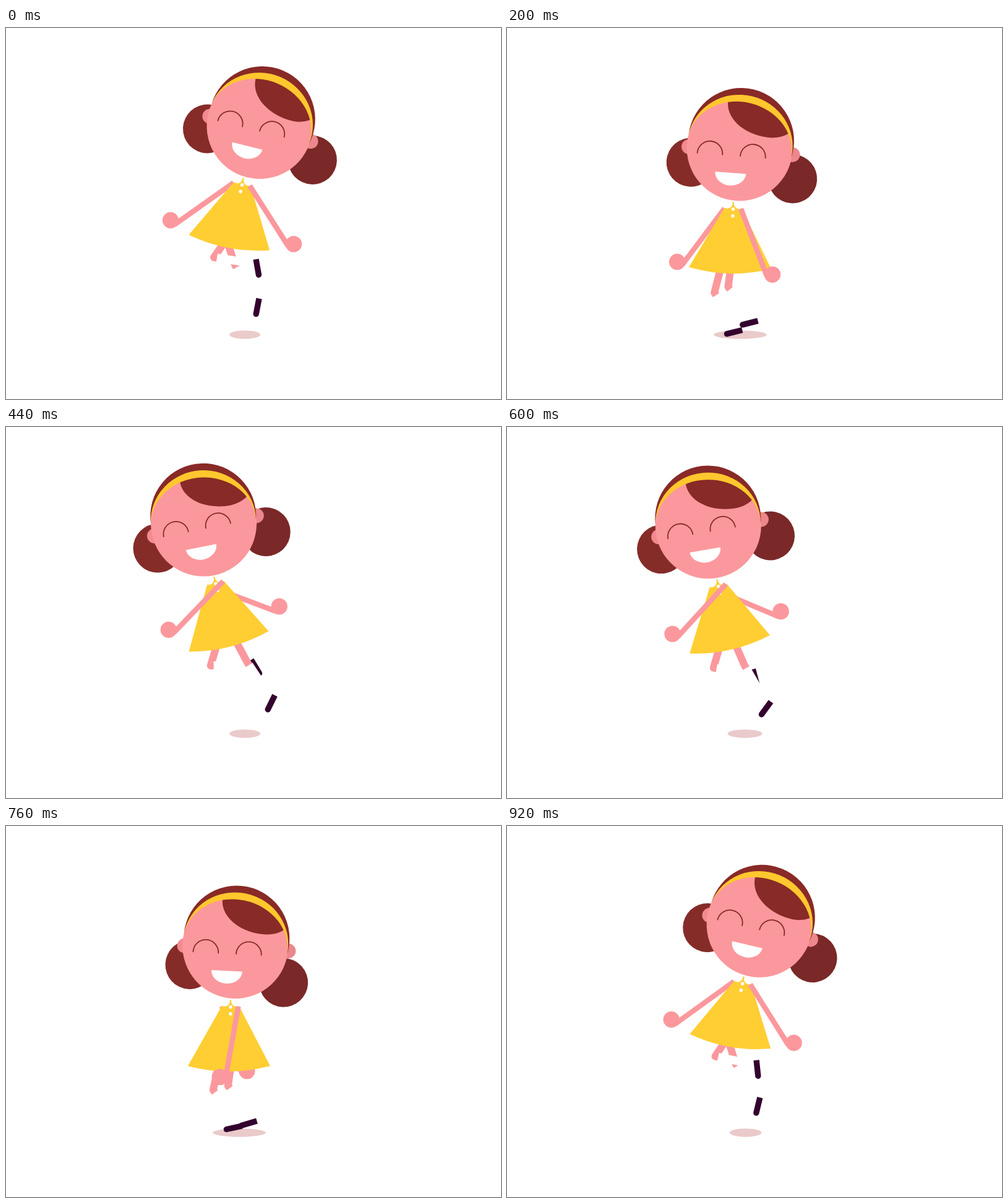
An HTML page with a canvas that plays this animation: 800 by 600 pixels, repeating every 960 ms.

```html
<!DOCTYPE html>
<html lang="en">
<head>
<meta charset="utf-8">
<title>Skipping girl</title>
<style>
  html, body { margin: 0; width: 100%; height: 100%; overflow: hidden; background: #fff; }
  canvas { display: block; width: 800px; height: 600px; }
</style>
</head>
<body>
<canvas id="stage" width="800" height="600"></canvas>
<script>
const ctx = document.getElementById('stage').getContext('2d');
const LOOP = 960, STEP = 40, RAD = Math.PI / 180, TAU = Math.PI * 2;
const SKIN = '#fb989d', HAIR = '#882a27', YELLOW = '#ffce33', SHOE = '#33032e';

// Swings from 1 to -1, holds, and returns; a higher power starts later.
function swing(t, arrive, leave, back, power = 1) {
  const ease = u => Math.cos(Math.PI * Math.min(1, u) ** power);
  return t < leave ? ease(t / arrive) : -ease((t - leave) / (back - leave));
}

// Smooth rise to 1 at the middle, 0 beyond the given width.
function bump(t, middle, width) {
  return Math.cos(Math.min(1, Math.abs(t - middle) / width) * Math.PI / 2) ** 2;
}

function oval(x, y, rx, color, ry = rx) {
  ctx.fillStyle = color;
  ctx.beginPath();
  ctx.ellipse(x, y, rx, ry, 0, 0, TAU);
  ctx.fill();
}

function line(points, width, color) {
  ctx.strokeStyle = color;
  ctx.lineWidth = width;
  ctx.lineCap = 'butt';
  ctx.lineJoin = 'round';
  ctx.beginPath();
  points.forEach(p => ctx.lineTo(...p));
  ctx.stroke();
}

function shape(d, color) {
  ctx.fillStyle = color;
  ctx.fill(new Path2D(d));
}

function local(x, y, deg, draw) {
  ctx.save();
  ctx.translate(x, y);
  ctx.rotate(deg * RAD);
  draw();
  ctx.restore();
}

function drawLeg(hip, knee, heel, foot) {
  const a = foot * RAD, dx = Math.cos(a), dy = Math.sin(a);
  const ankle = [heel[0] + 6 * dx - 5 * dy, heel[1] + 6 * dy + 5 * dx];
  const ux = ankle[0] - knee[0], uy = ankle[1] - knee[1], k = 5 / Math.hypot(ux, uy);
  const cuff = [knee[0] + ux * k, knee[1] + uy * k];
  line([hip, knee, cuff], 12, SKIN);
  line([cuff, ankle], 13.5, '#fff');
  local(...heel, foot, () =>
    shape('M0-4.7H25.5A4.7 4.7 0 0 1 25.5 4.7H0Z', SHOE));
}

// The legs trade roles with the sway; the planted foot is set apart by the stride.
function drawLegs(sway, low, touch, stride, hipY) {
  const between = (a, b) => (a + b + (a - b) * sway) / 2;
  const side = stride * low, apart = 13 * side, lift = 4 * side;
  drawLeg(
    [between(356, 344) + 5 * low - 9 * side, hipY],
    [between(370, 330) - 7 * low - apart, between(383, 386) + 40 * low + lift],
    [between(409, 396) - 11 * touch - 13 * stride * touch,
      between(437.5, 375.5) + 70 * touch + lift],
    between(101, 58) + 81 * touch);
  drawLeg(
    [between(357, 369) - 8 * low + 9 * side, hipY],
    [between(336, 391) - 12 * low + apart, between(371, 381) + 48 * low - lift],
    [between(404, 435) - 23 * touch + 13 * stride * touch,
      between(374, 435) + 81 * touch - lift],
    between(80, 117) + 72 * touch);
}

function drawArm(neck, turn, side, deg, length) {
  const r = turn * RAD, c = Math.cos(r), s = Math.sin(r);
  const x = neck[0] + side * c - 10 * s, y = neck[1] + side * s + 10 * c;
  const a = deg * RAD, dx = -Math.sin(a), dy = Math.cos(a);
  const hx = x + dx * length, hy = y + dy * length;
  // The wrist sits on the inner side of the hand and swaps as the arm passes vertical.
  const flip = Math.max(-1, Math.min(1, deg / 8)) * 9;
  const wrist = [hx - 4 * dx + flip * dy, hy - 4 * dy - flip * dx];
  line([[x, y], wrist], 8.5, SKIN);
  oval(...wrist, 4.25, SKIN);
  oval(hx, hy, 13.2, SKIN);
}

function drawDress(neck, turn) {
  local(...neck, turn, () => {
    shape('M-14 9L0-1L14 10L63.5 106.5Q-4 124-69.5 106.3Z', YELLOW);
    oval(-9.5, 1.5, 8.5, '#fff');
    oval(9.5, 2, 8.5, '#fff');
    oval(0, 11, 2.8, '#fff');
    oval(-0.3, 22, 2.8, '#fff');
  });
}

function drawHead(x, y, turn, nod, droop) {
  local(x, y, turn, () => {
    oval(-81 + 9 * droop, 24.5 + 10 * droop, 39.5, '#852c29');
    oval(96 - 15.5 * droop, 33 + 23 * droop, 39.5, '#7a2828');
    oval(-82, 4, 12, '#f38a90');
    oval(86, 4.4, 12, '#ec878d');
    oval(0, 0, 85.5, SKIN);
    shape('M-24.5-72C-24-43 10-20 50-20.5Q64-21 75.5-28L79-35L50-66L10-82L-25-76Z', HAIR);
    local(1.3, -10.5, 9, () => {
      shape('M-85 8A85.5 85.5 0 1 1 85 8A85 80 0 0 0-85 8Z', HAIR);
      shape('M-85 10V6A85 81.5 0 0 1 85 6V10A85 74 0 0 0-85 10Z', '#ffc72e');
    });
    ctx.translate(0, nod);
    ctx.strokeStyle = HAIR;
    ctx.lineWidth = 1.8;
    ctx.lineCap = 'round';
    for (const ex of [-47.3, 22.3]) {
      ctx.beginPath();
      ctx.arc(ex, 13.2, 20.4, Math.PI, TAU);
      ctx.stroke();
    }
    shape('M-36.7 41.5H13.3A25 20.5 0 0 1-36.7 41.5Z', '#fff');
  });
}

function draw(t) {
  const sway = swing(t, 480, 520, 960);
  const reach = swing(t, 455, 480, 930, 1.75);
  const low = bump(t, 200, 190) + bump(t, 750, 190);
  const droop = bump(t, 280, 150) + bump(t, 750, 150);
  const touch = Math.min(1, 1.6 * low);
  const stride = t < 480 ? 1 : -1;

  const neck = [359.5 + 24 * sway, 243 + 39 * low];
  const turn = -2.1 + 12.8 * sway;
  const lean = (3 + 14.4 * sway) * RAD;
  const leftArm = -7.8 + 67 * reach, rightArm = 6 - 43 * reach;

  ctx.fillStyle = '#fff';
  ctx.fillRect(0, 0, 800, 600);
  oval(386 - 9 * touch, 496, 25 + 18 * touch, '#eacaca', 6.7);
  drawLegs(sway, low, touch, stride, neck[1] + 98);
  drawArm(neck, turn, -14, leftArm, 108 + 0.18 * Math.abs(leftArm));
  drawDress(neck, turn);
  drawArm(neck, turn, 12.5, rightArm, 118);
  drawHead(neck[0] + 88.5 * Math.sin(lean), neck[1] - 88.5 * Math.cos(lean),
    1 + 12.8 * sway, -5.5 * sway * sway, droop);
}

function tick() {
  draw(Math.floor(performance.now() % LOOP / STEP) * STEP);
  requestAnimationFrame(tick);
}
tick();
</script>
</body>
</html>
```
